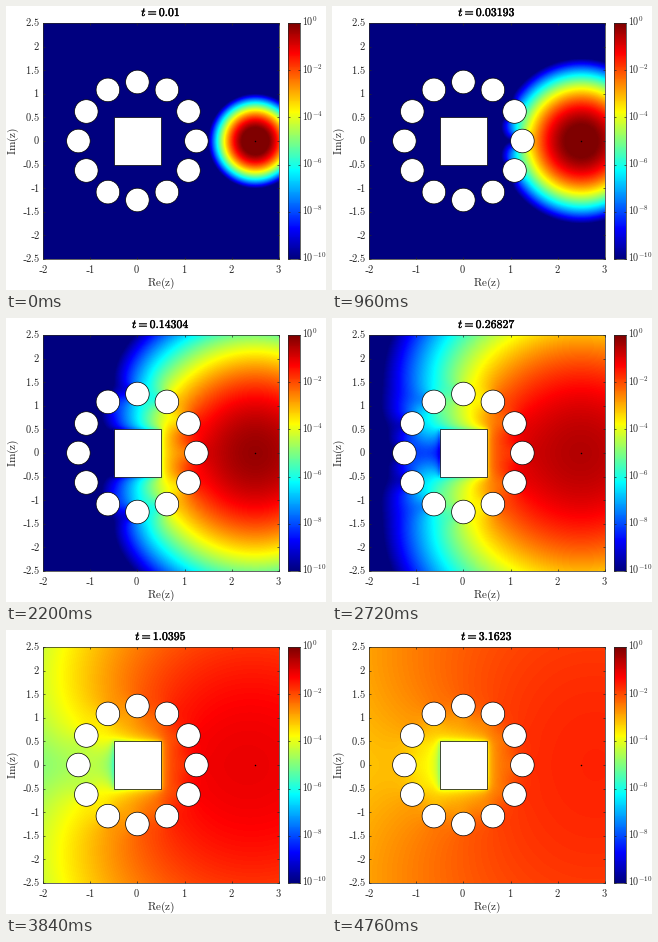
A matplotlib script that plays this animation: 320x284 px, repeating every 4800 ms.

```python
import numpy as np
import matplotlib.pyplot as plt
from matplotlib.animation import FuncAnimation
from matplotlib.colors import ListedColormap
from matplotlib.lines import Line2D
from matplotlib.patches import Circle, Rectangle
from matplotlib.patheffects import withStroke

W, H, DPI = 320, 284, 100
FRAMES, INTERVAL = 120, 40
PT = 72 / DPI
INK = "#262626"
TIMES = 10 ** np.linspace(-2, 0.5, FRAMES)
SOURCE = 2.5
RING, RADIUS, HALF = 1.25, 0.25, 0.5
ANGLES = np.arange(12) * np.pi / 6
CENTERS = [(RING * np.cos(a), RING * np.sin(a)) for a in ANGLES]

plt.rcParams["mathtext.fontset"] = "cm"


# Heat equation on the upper half plane: uniform mesh in view, stretched beyond it.
STEP = 0.025
PAD = np.cumsum(STEP * 1.12 ** np.arange(1, 35))
NX, NY = 201, 101
VIEW = slice(len(PAD), len(PAD) + NX)


def build_mesh():
    x = np.concatenate([-2 - PAD[::-1], np.linspace(-2, 3, NX), 3 + PAD])
    y = np.concatenate([np.linspace(0, 2.5, NY), 2.5 + PAD])
    return x, y


def masks(x, y):
    gx, gy = np.meshgrid(x, y)
    discs = np.zeros(gx.shape, bool)
    for cx, cy in CENTERS:
        discs |= np.hypot(gx - cx, gy - cy) < RADIUS
    box = np.maximum(abs(gx), abs(gy)) < HALF + STEP / 4
    return discs, box


def couplings(pos, width, discs, box):
    """Exchange rates along the last axis: discs insulate, the box absorbs."""
    closed = discs[:, 1:] | discs[:, :-1]
    gain = np.where(closed, 0, 1 / np.diff(pos))
    low = gain / width[:-1] * ~box[:, :-1]
    high = gain / width[1:] * ~box[:, 1:]
    return low, high


def mirror(a):
    return np.concatenate([a[NY - 1:0:-1, VIEW], a[:NY, VIEW]])


def log_field(u, solid):
    """Mirrored log10 field, continued slightly into the obstacles."""
    v = np.where(solid, 0, mirror(u))
    for _ in range(2):
        near = np.max([np.roll(v, s, axis) for s in (1, -1) for axis in (0, 1)], axis=0)
        v = np.where(solid, near, v)
    return np.log10(np.clip(v, 1e-10, 1))


def solve():
    x, y = build_mesh()
    discs, box = masks(x, y)
    wx, wy = np.gradient(x), np.gradient(y)
    wy[0] = STEP / 2
    rates_x = couplings(x, wx, discs, box)
    rates_y = [r.T for r in couplings(y, wy, discs.T, box.T)]

    t0 = TIMES[0]
    dist2 = (x[None, :] - SOURCE) ** 2 + y[:, None] ** 2
    u = np.maximum(np.exp(-dist2 / (4 * t0)) / (4 * np.pi * t0), 1e-25)
    u[box] = 0
    u = u.astype(np.float32)
    solid = mirror(discs | box)

    fields = [log_field(u, solid)]
    for start, end in zip(TIMES[:-1], TIMES[1:]):
        ratio = 1 / 6 if start < 0.15 else 0.4
        n = int(np.ceil((end - start) / (ratio * STEP ** 2)))
        dt = (end - start) / n
        ax_lo, ax_hi = [np.ascontiguousarray(r * dt, np.float32) for r in rates_x]
        ay_lo, ay_hi = [np.ascontiguousarray(r * dt, np.float32) for r in rates_y]
        for _ in range(n):
            d = u[:, 1:] - u[:, :-1]
            u[:, :-1] += ax_lo * d
            u[:, 1:] -= ax_hi * d
            d = u[1:] - u[:-1]
            u[:-1] += ay_lo * d
            u[1:] -= ay_hi * d
        fields.append(log_field(u, solid))
    return fields


def jet():
    v = np.linspace(0, 1, 256)
    rgb = [np.clip(1.5 - abs(4 * v - c), 0, 1) for c in (3, 2, 1)]
    return ListedColormap(np.transpose(rgb))


fig = plt.figure(figsize=(W / DPI, H / DPI), dpi=DPI, facecolor="white")


def add_axes(left, top, width, height):
    ax = fig.add_axes([left / W, 1 - (top + height) / H, width / W, height / H])
    for spine in ax.spines.values():
        spine.set(color=INK, linewidth=0.5)
    ax.tick_params(direction="in", length=2.4 * PT, width=0.5, color=INK,
                   top=True, right=True, labelbottom=False, labelleft=False)
    return ax


def put(x, y, text, size, ha="center", **kw):
    kw = {"color": INK, "va": "baseline", **kw}
    return fig.text(x / W, 1 - y / H, text, fontsize=size * PT, ha=ha, **kw)


def number(x, y, value, ha, em=10.4):
    """Tick label with a short hyphen as its sign."""
    digits = f"{abs(value):g}"
    width = em * (0.5 * len(digits.replace(".", "")) + 0.28 * ("." in digits))
    sign = 0.33 * em if value < 0 else 0
    right = x if ha == "right" else x + (width + sign) / 2
    put(right, y, rf"$\mathrm{{{digits}}}$", em, ha="right")
    if sign:
        end = right - width - 0.05 * em
        level = 1 - (y - 0.22 * em) / H
        fig.add_artist(Line2D([(end - 0.27 * em) / W, end / W], [level, level],
                              color=INK, lw=0.6, solid_capstyle="butt"))


LEFT, TOP, SIDE = 37, 17, 236
UNIT = SIDE / 5
fields = solve()
cmap = jet()

ax = add_axes(LEFT, TOP, SIDE, SIDE)
m = STEP / 2
image = ax.imshow(fields[0], cmap=cmap, vmin=-10, vmax=0, origin="lower", aspect="auto",
                  extent=(-2 - m, 3 + m, -2.5 - m, 2.5 + m), interpolation="bilinear")
edge = dict(facecolor="white", edgecolor="black", linewidth=0.5, zorder=2)
for c in CENTERS:
    ax.add_patch(Circle(c, RADIUS, **edge))
ax.add_patch(Rectangle((-HALF, -HALF), 2 * HALF, 2 * HALF, **edge))
ax.plot(SOURCE, 0, "o", color="black", ms=1.1, mew=0)
ax.set(xlim=(-2, 3), ylim=(-2.5, 2.5),
       xticks=np.arange(-2, 4), yticks=np.arange(-2.5, 2.6, 0.5))

for k in range(-2, 4):
    number(LEFT + (k + 2) * UNIT, 267, k, "center")
for k in range(-5, 6):
    number(33.5, TOP + SIDE / 2 - k / 2 * UNIT + 3.4, k / 2, "right")
put(155, 280, r"$\mathrm{Re(z)}$", 11.2)
put(7, 135, r"$\mathrm{Im(z)}$", 11.2, rotation=90, va="center")

bar = add_axes(282, TOP, 12, SIDE)
bar.imshow(np.linspace(-10, 0, 256)[:, None], cmap=cmap, origin="lower",
           aspect="auto", extent=(0, 1, -10, 0))
bar.set(xticks=[], yticks=range(-10, 1, 2))
for k in range(0, 11, 2):
    exponent = -k if k else 0
    put(296.5, TOP + k * SIDE / 10 + 3.4, rf"$10^{{{exponent}}}$", 10, ha="left")

title = put(155, 10, "", 11.8, color="black",
            path_effects=[withStroke(linewidth=0.25, foreground="black")])


def update(i):
    image.set_data(fields[i])
    title.set_text(rf"$t = \mathbf{{{TIMES[i]:.5g}}}$")
    return image, title


anim = FuncAnimation(fig, update, frames=FRAMES, interval=INTERVAL, repeat=True)
plt.show()
```
